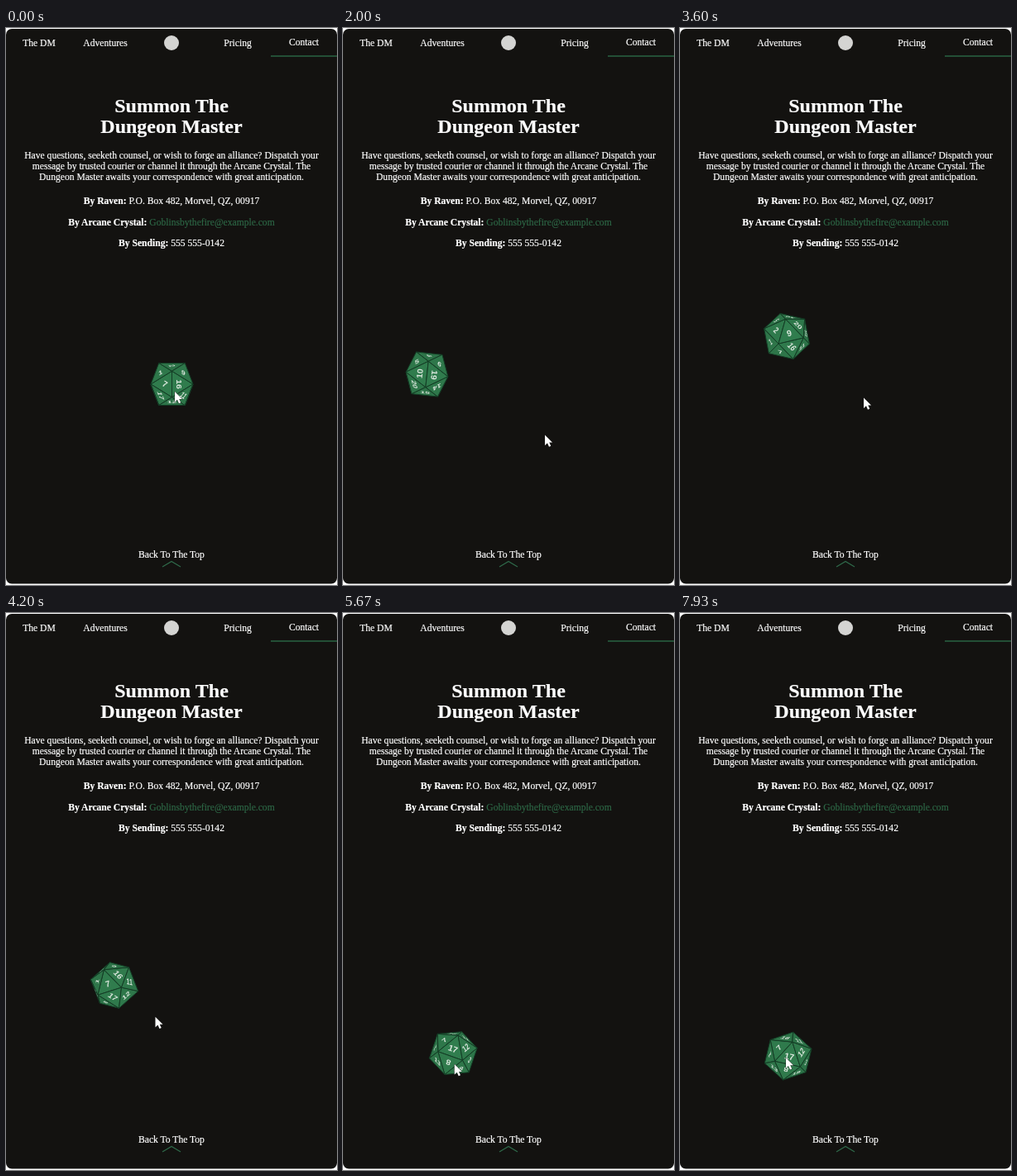
Animation of 400x674 px, one loop 8000 ms. Source, as an HTML page with a canvas:

```html
<!DOCTYPE html>
<html lang="en">
<head>
<meta charset="utf-8">
<title>Summon The Dungeon Master</title>
<style>
  html, body { margin: 0; width: 100%; height: 100%; overflow: hidden; background: #fff; }
  svg, canvas { position: absolute; left: 0; top: 0; width: 400px; height: 674px; }
  text { font: 11.6px "Liberation Serif", serif; fill: #fff; stroke: #fff; stroke-width: .2px; text-anchor: middle; }
  .title { font-size: 24px; font-weight: bold; }
  .bold { font-weight: bold; }
  .mail { fill: #2d6645; stroke: #2d6645; }
</style>
</head>
<body>
<svg viewBox="0 0 400 674">
  <rect y="1" width="400" height="671.5" rx="7" fill="#131210"/>
  <text x="40" y="21.5">The DM</text>
  <text x="120" y="21.5">Adventures</text>
  <circle cx="200" cy="18" r="9" fill="#d4d4d2"/>
  <text x="280" y="21.5">Pricing</text>
  <text x="360" y="20.5">Contact</text>
  <path d="M320 34H400" stroke="#286343" stroke-width="1.5"/>
  <text class="title" x="200" y="102">Summon The</text>
  <text class="title" x="200" y="127">Dungeon Master</text>
  <text x="200" y="158">Have questions, seeketh counsel, or wish to forge an alliance? Dispatch your</text>
  <text x="200" y="171">message by trusted courier or channel it through the Arcane Crystal. The</text>
  <text x="200" y="184">Dungeon Master awaits your correspondence with great anticipation.</text>
  <text x="200" y="213"><tspan class="bold">By Raven:</tspan> P.O. Box 482, Morvel, QZ, 00917</text>
  <text x="200" y="239"><tspan class="bold">By Arcane Crystal:</tspan> <tspan class="mail">Goblinsbythefire@example.com</tspan></text>
  <text x="200" y="264"><tspan class="bold">By Sending:</tspan> 555 555-0142</text>
  <text x="200" y="641">Back To The Top</text>
  <path d="M189 652L200 645.5L211 652" fill="none" stroke="#2f6a4a" stroke-width="1.3"/>
</svg>
<canvas width="400" height="674"></canvas>
<script>
const ctx = document.querySelector('canvas').getContext('2d');
const LOOP = 8000, FPS = 15, RADIUS = 30;

const dot = (a, b) => a[0] * b[0] + a[1] * b[1] + a[2] * b[2];
const cross = (a, b) => [a[1] * b[2] - a[2] * b[1], a[2] * b[0] - a[0] * b[2], a[0] * b[1] - a[1] * b[0]];
const scale = (a, k) => a.map(n => n * k);
const add = (...vs) => vs.reduce((a, b) => a.map((n, i) => n + b[i]));
const unit = a => scale(a, 1 / Math.hypot(...a));
const mix = (a, b, k) => a.map((n, i) => n + (b[i] - n) * k);

// Icosahedron corners a..l; x right, y down, z towards the viewer.
const P = (1 + Math.sqrt(5)) / 2;
const corners = {
  a: [0, -1, P], b: [0, 1, P], c: [-P, 0, 1], d: [P, 0, 1],
  e: [-1, -P, 0], f: [1, -P, 0], g: [-1, P, 0], h: [1, P, 0],
  i: [-P, 0, -1], j: [P, 0, -1], k: [0, -1, -P], l: [0, 1, -P]
};
for (const name in corners) corners[name] = scale(unit(corners[name]), RADIUS);

// Each number's top points to the first corner of its face.
const faces = ('7abc 16dab 1eac 2fae 9fad 17bcg 12bgh 11dbh 8icg 20jdf ' +
  '15jdh 3hgl 18gil 13cei 4eik 5efk 10fjk 14hjl 19ljk 6ikl').split(' ').map(s => ({
  label: parseInt(s), names: s.replace(/\d/g, '')
}));

const frameOf = (u, v) => {
  const x = unit(u), z = unit(cross(u, v));
  return [x, cross(z, x), z];
};
const lift = ([x, y]) => [x, y, Math.sqrt(RADIUS * RADIUS - x * x - y * y)];

// An orientation is fixed by where two corners appear, relative to the die's centre.
function pose(nameA, atA, nameB, atB) {
  const body = frameOf(corners[nameA], corners[nameB]);
  const seen = frameOf(lift(atA), lift(atB));
  return v => add(...body.map((axis, i) => scale(seen[i], dot(v, axis))));
}

const keys = [
  { t: 0, die: [200.5, 431], cursor: [204, 440], turn: pose('a', [0, -15.8], 'b', [0, 15.8]) },
  { t: 1000, die: [88.5, 526], cursor: [204, 440], turn: pose('d', [1, -15.5], 'h', [-1, 15.5]) },
  { t: 2000, die: [101.5, 419], cursor: [244, 492.5], turn: pose('k', [1.7, -15.7], 'j', [-1.7, 15.7]) },
  { t: 3600, die: [129, 373], cursor: [222, 447.5], turn: pose('a', [-10, 9], 'd', [20, 2]) },
  { t: 4800, die: [133, 528], cursor: [139, 530], turn: pose('g', [6, 2], 'b', [5, -26]) },
  { t: 6600, die: [133.5, 537.5], cursor: [130, 564], turn: pose('b', [8, -16], 'c', [-13, 6]) },
  { t: 7930, die: [130.5, 536], cursor: [128, 538], turn: pose('b', [5, -17], 'c', [-16, 6]) }
];

function blendTurn(from, to, k) {
  const axes = [[1, 0, 0], [0, 1, 0], [0, 0, 1]];
  const p = axes.map(from), q = axes.map(to);
  const trace = p.reduce((sum, v, i) => sum + dot(v, q[i]), 0);
  const axis = unit(add(...p.map((v, i) => cross(v, q[i]))));
  const angle = Math.acos(Math.max(-1, Math.min(1, (trace - 1) / 2))) * k;
  const c = Math.cos(angle), s = Math.sin(angle);
  return v => {
    const w = from(v);
    return add(scale(w, c), scale(cross(axis, w), s), scale(axis, dot(axis, w) * (1 - c)));
  };
}

function drawDie([x, y], turn) {
  ctx.lineJoin = 'round';
  ctx.textAlign = 'center';
  ctx.textBaseline = 'middle';
  ctx.font = 'bold 10.5px "Liberation Sans", sans-serif';
  for (const { label, names } of faces) {
    const points = [...names].map(n => turn(corners[n]));
    const centre = scale(add(...points), 1 / 3);
    if (centre[2] <= 0) continue;
    const normal = unit(centre);
    const up = unit(add(points[0], scale(centre, -1)));
    const right = cross(normal, up);

    ctx.setTransform(1, 0, 0, 1, x, y);
    ctx.beginPath();
    for (const p of points) ctx.lineTo(p[0], p[1]);
    ctx.closePath();
    ctx.fillStyle = `hsl(143 44% ${30 + 4 * normal[2]}%)`;
    ctx.fill();
    ctx.strokeStyle = '#143c25';
    ctx.lineWidth = 1;
    ctx.stroke();

    ctx.transform(right[0], right[1], -up[0], -up[1], centre[0], centre[1]);
    ctx.fillStyle = '#dde8df';
    ctx.fillText(label, 0, 0.5);
  }
}

const arrow = new Path2D('M0 0V12.5L3 9.8L5 14.3L7.2 13.3L5.2 9H9Z');
function drawCursor([x, y]) {
  ctx.setTransform(1, 0, 0, 1, x, y);
  ctx.fillStyle = '#fff';
  ctx.strokeStyle = '#222';
  ctx.lineWidth = 0.7;
  ctx.stroke(arrow);
  ctx.fill(arrow);
}

function draw(now) {
  const t = Math.floor((now % LOOP) * FPS / 1000 + 0.01) * 1000 / FPS;
  let n = 0;
  while (n < keys.length - 2 && t >= keys[n + 1].t) n++;
  const from = keys[n], to = keys[n + 1];
  const k = Math.min(1, (t - from.t) / (to.t - from.t));
  ctx.setTransform(1, 0, 0, 1, 0, 0);
  ctx.clearRect(0, 0, 400, 674);
  drawDie(mix(from.die, to.die, k), blendTurn(from.turn, to.turn, k));
  drawCursor(mix(from.cursor, to.cursor, k * k * (3 - 2 * k)));
}

const start = performance.now();
function tick() {
  draw(performance.now() - start);
  requestAnimationFrame(tick);
}
tick();
</script>
</body>
</html>
```
